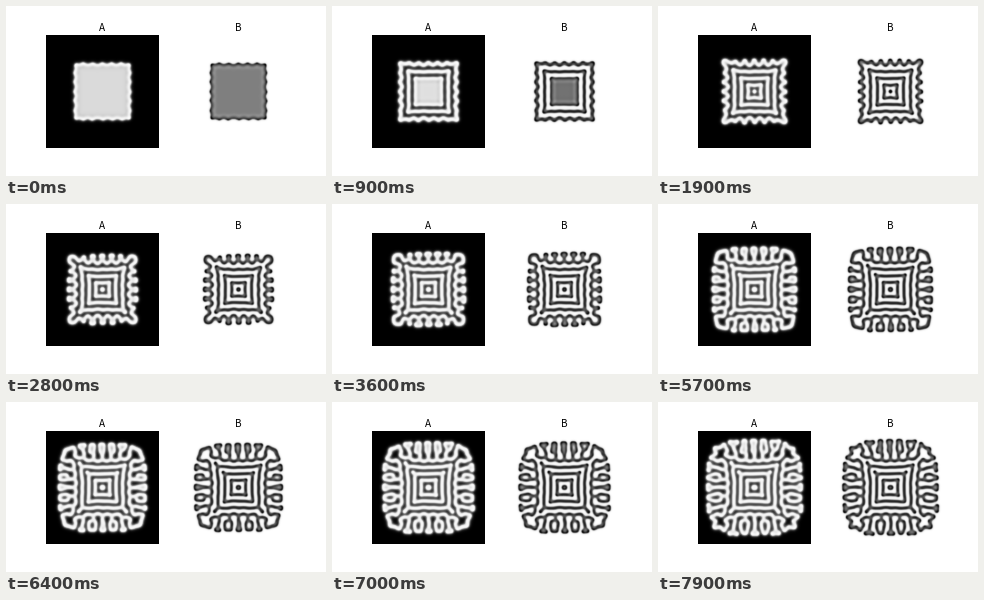
Recreate the animation shown at these times as a matplotlib script. Size 320 px wide and 170 px high, loop 8 s.

```python
import numpy as np
import matplotlib.pyplot as plt
from matplotlib.animation import FuncAnimation

# Gray-Scott reaction-diffusion, coral regime
N = 200
HALF = N // 4
FEED, KILL = 0.060, 0.062
DIFF = np.array([0.16, 0.08], dtype=np.float32).reshape(2, 1, 1)

FRAMES, INTERVAL = 80, 100
EVERY = 20           # steps between stored states
START = 120          # step shown first
REACH = 87           # half extent of the grown pattern, in cells
MAX_STEPS = 10000

# Small bumps on the square's edges: top, right, bottom, left
BUMPS = [
    (-34, -17, 0, 16, 33),
    (-33, -17, 1, 17, 34),
    (-35, -18, -1, 18, 34),
    (-34, -16, 0, 17, 33),
]


def initial_state():
    rng = np.random.default_rng(7)
    mid = N // 2
    inside = np.zeros((N, N), dtype=bool)
    inside[mid - HALF:mid + HALF, mid - HALF:mid + HALF] = True
    for side in BUMPS:
        for p in side:
            inside[mid - HALF - 2:mid - HALF, mid + p - 4:mid + p + 4] = True
        inside = np.rot90(inside).copy()
    a = 1 - 0.1 * rng.random((N, N))
    b = 0.1 * rng.random((N, N))
    a[inside], b[inside] = 0.50, 0.25
    return np.stack([a, b]).astype(np.float32)


def laplacian(w):
    return (np.roll(w, 1, 1) + np.roll(w, -1, 1)
            + np.roll(w, 1, 2) + np.roll(w, -1, 2) - 4 * w)


def step(w):
    change = DIFF * laplacian(w)
    a, b = w
    reaction = a * b * b
    change[0] += FEED * (1 - a) - reaction
    change[1] += reaction - (FEED + KILL) * b
    w += change


def half_extent(b):
    mask = b > 0.1
    spans = [np.flatnonzero(mask.any(axis=k)) for k in (0, 1)]
    return sum(np.ptp(s) + 1 for s in spans if s.size) / 4


def grow():
    w = initial_state()
    states = []
    for n in range(MAX_STEPS):
        if n >= START and (n - START) % EVERY == 0:
            states.append(w.copy())
            if half_extent(w[1]) >= REACH:
                break
        step(w)
    return states


states = grow()


def state_at(frame):
    pos = frame / (FRAMES - 1) * (len(states) - 1)
    i = min(int(pos), len(states) - 2)
    t = pos - i
    return (1 - t) * states[i] + t * states[i + 1]


W, H, DPI = 320, 170, 100
fig = plt.figure(figsize=(W / DPI, H / DPI), dpi=DPI, facecolor="white")


def panel(left, title, field):
    top, size = 29, 113
    ax = fig.add_axes([left / W, 1 - (top + size) / H, size / W, size / H])
    ax.axis("off")
    fig.text((left + size / 2) / W, 1 - 25 / H, title, ha="center",
             va="baseline", fontsize=7.2, family="Noto Sans CJK JP",
             color="black")
    return ax.imshow(field, cmap="Greys", interpolation="hanning",
                     aspect="auto")


first = state_at(0)
images = [panel(40, "A", first[0]), panel(176, "B", first[1])]


def draw(frame):
    for image, field in zip(images, state_at(frame)):
        image.set_data(field)
        image.set_clim(field.min(), field.max())
    return images


anim = FuncAnimation(fig, draw, frames=FRAMES, interval=INTERVAL,
                     init_func=lambda: draw(0), repeat=True, repeat_delay=0)
plt.show()
```
